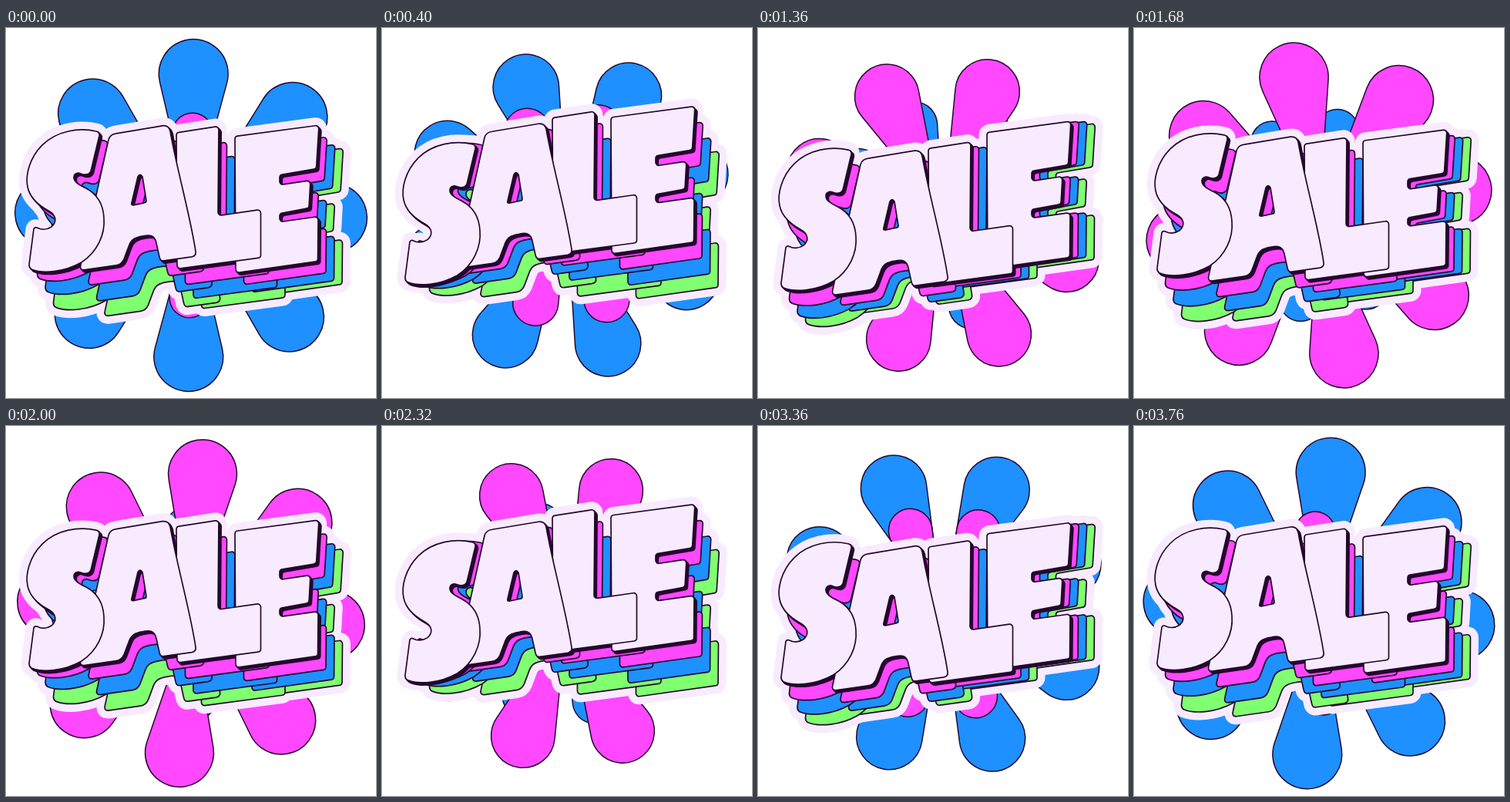
These frames come from a looping animation (480 by 480 pixels, 3840 ms). An HTML page with a canvas:

```html
<!DOCTYPE html>
<html lang="en">
<head>
<meta charset="utf-8">
<title>Sale</title>
<style>
  html, body { margin: 0; width: 100%; height: 100%; overflow: hidden; background: #fff; }
  canvas { display: block; width: 480px; height: 480px; }
</style>
</head>
<body>
<canvas width="480" height="480" role="img" aria-label="SALE"></canvas>
<script>
const ctx = document.querySelector('canvas').getContext('2d');
const STEP = 80, STEPS = 48, TAU = Math.PI * 2;
const INK = '#25072e', PAPER = '#f8ebff', BLUE = '#1e90ff', PINK = '#ff48ff', GREEN = '#80ff70';

// Closed polygon with rounded corners
function roundPoly(points, r) {
  const path = new Path2D();
  const [a, b] = [points[points.length - 1], points[0]];
  path.moveTo((a[0] + b[0]) / 2, (a[1] + b[1]) / 2);
  points.forEach((p, i) => {
    const next = points[(i + 1) % points.length];
    path.arcTo(...p, ...next, r);
  });
  path.closePath();
  return path;
}

// base: resting offset, peak: step at which the letter is lowest
const S = {
  base: 20.4, peak: 11.7,
  path: new Path2D(`M117 134C95 129 66 133 47 152C30 169 25 192 28 206C31 221 44 231 55 237
    C66 243 66 252 59 258C53 262 46 262 40 259Q37 258 36 261L30 307Q30 311 33 313
    C48 319 75 317 98 304C118 291 129 268 127 246C126 228 117 215 104 208
    C96 204 88 200 88 194C88 189 93 187 97 189C102 191 107 191 110 186L121 140Q122 135 117 134Z`)
};
const A = {
  base: -4.3, peak: 14.9,
  path: new Path2D(`M143 156L203 146Q211 145 213 153C221 200 239 262 246 309Q247 315 241 316
    L205 321Q200 322 199 316L195 298C193 288 187 287 178 289C166 291 162 294 159 303
    L153 319Q150 326 143 327L101 333Q95 333 97 326L133 164Q135 157 143 156Z
    M171 212Q174 207 177 212L182 243Q182 246 179 246L165 249Q162 249 163 246Z`)
};
const L = {
  base: 9, peak: 17.9,
  path: roundPoly([[221, 127.5], [276, 119], [275, 235], [330.5, 227], [330.5, 289.5], [222, 304]], 4)
};
const E = {
  base: 19.75, peak: 21.1,
  path: roundPoly([[297, 106], [406, 91.5], [402.5, 148], [355, 156], [355, 169], [395, 163],
    [393, 199], [355, 206], [355, 217], [405, 210], [404.5, 268], [298, 283]], 4)
};
const letters = [E, L, A, S];

// Layers trail the front lettering in place and in time
const layers = [[3, GREEN], [2, BLUE], [1, PINK]];

function eachLetter(n, depth, draw) {
  for (const { base, peak, path } of letters) {
    const y = base + 20.5 * Math.cos((n - peak - 2 * depth) / 24 * TAU);
    ctx.save();
    ctx.translate(10.5 * depth, y + 10.2 * depth);
    draw(path);
    ctx.restore();
  }
}

function paint(path, fill, stroke, width) {
  ctx.fillStyle = fill;
  ctx.strokeStyle = stroke;
  ctx.lineWidth = width;
  ctx.fill(path, 'evenodd');
  ctx.stroke(path);
}

function flower(reach, degrees, color) {
  const r = reach * 0.245, half = Math.asin(0.245);
  const petal = new Path2D();
  petal.moveTo(0, 0);
  petal.arc(0, -reach, r, Math.PI - half, half);
  petal.closePath();
  ctx.save();
  ctx.translate(240, 243);
  ctx.rotate(degrees * Math.PI / 180);
  for (let i = 0; i < 8; i++) {
    paint(petal, color, INK, 1.5);
    ctx.rotate(TAU / 8);
  }
  ctx.restore();
}

function draw(n) {
  ctx.clearRect(0, 0, 480, 480);
  ctx.lineJoin = 'round';

  const turn = 3.75 * n;
  const pulse = (n - 22.8) / STEPS * TAU;
  flower(147 + 36.5 * Math.cos((n + 0.5) / STEPS * TAU), 1 - turn, BLUE);
  flower(144.8 + 37 * Math.cos(pulse) + 1.8 * Math.cos(3 * pulse), 1 + turn, PINK);

  for (const depth of [3, 2, 1, 0]) {
    eachLetter(n, depth, path => paint(path, PAPER, PAPER, 21));
  }
  for (const [depth, color] of layers) {
    eachLetter(n, depth, path => paint(path, color, INK, 1.7));
  }
  eachLetter(n, 0, path => {
    for (let i = 0; i < 4; i++) {
      ctx.translate(0.8, 0.8);
      paint(path, INK, INK, 1.7);
    }
  });
  eachLetter(n, 0, path => paint(path, PAPER, INK, 1.7));
}

let shown = -1;
function tick() {
  const n = Math.floor(performance.now() / STEP) % STEPS;
  if (n !== shown) draw(shown = n);
  requestAnimationFrame(tick);
}
tick();
</script>
</body>
</html>
```
